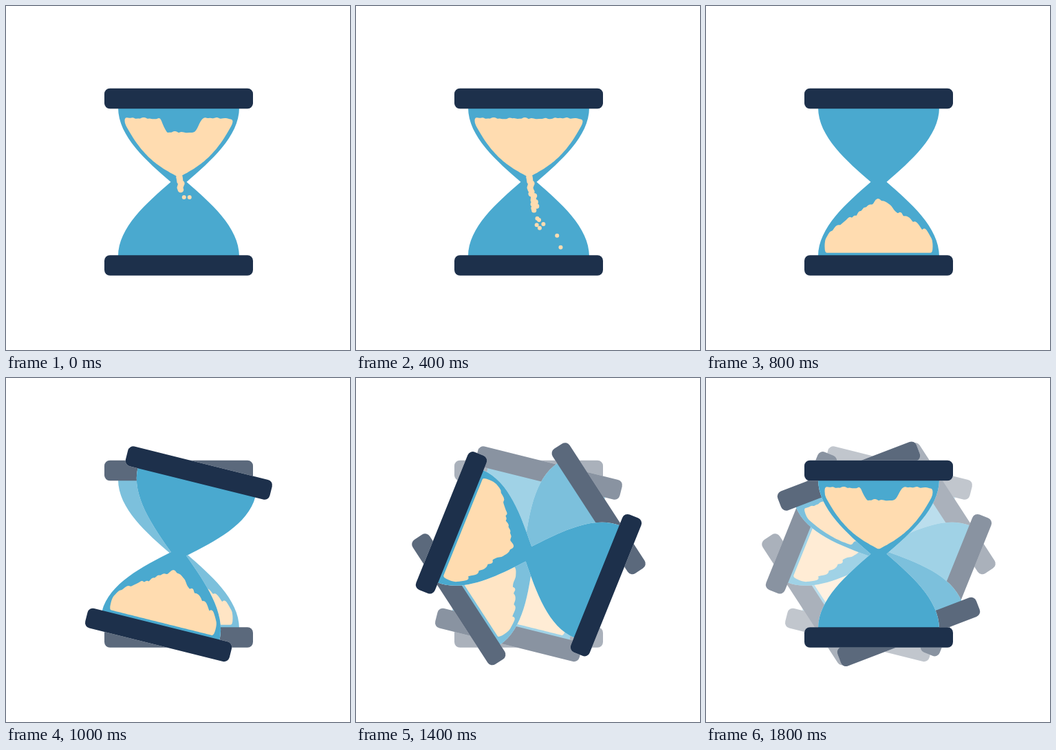
Write an HTML page that moves like this. It is 500 px wide and 500 px high and loops after 2000 ms.

```html
<!DOCTYPE html>
<html lang="en">
<head>
<meta charset="utf-8">
<title>Hourglass</title>
<style>
  html, body { margin: 0; width: 100%; height: 100%; overflow: hidden; background: #fff; }
  svg { display: block; width: 100vw; height: 100vh; }
  .cap { fill: var(--blank, #1d304b); }
  .glass { fill: var(--blank, #4aa9cf); }
  .sand { fill: #ffdcb0; }
  path.sand { stroke: #ffdcb0; stroke-width: 3; stroke-linejoin: round; }
  .blank { --blank: #fff; }
</style>
</head>
<body>
<svg id="stage" viewBox="0 0 500 500">
  <defs>
    <g id="hourglass">
      <path class="glass" d="M-88-108C-88-66-46-30-11.500 0C-46 30-88 66-88 108H88C88 66 46 30 11.500 0C46-30 88-66 88-108Z"/>
      <rect class="cap" x="-108" y="-136" width="216" height="29.500" rx="8"/>
      <rect class="cap" x="-108" y="106.500" width="216" height="29.500" rx="8"/>
    </g>
  </defs>
</svg>
<script>
const STEP = 200, STEPS = 10, TURN_START = 4;
const FADE = 0.72;
const CX = 251, CY = 255.75;
const stage = document.getElementById('stage');

function add(parent, tag, attrs) {
  const el = document.createElementNS('http://www.w3.org/2000/svg', tag);
  for (const key in attrs) el.setAttribute(key, attrs[key]);
  return parent.appendChild(el);
}

const noise = (k, seed) => {
  const v = Math.sin(k * 12.9898 + seed * 78.233) * 43758.5453;
  return v - Math.floor(v);
};
const clamp = (v, lo, hi) => Math.min(hi, Math.max(lo, v));

// Sand lies in one bulb, between a surface near the neck and one near the cap
const heap = { crest: 27, slope: 0.66, base: 101.5, notch: 0 };
const filled = (base, notch, crest = 0) => ({ crest, slope: 0, base, notch });
const states = [
  filled(91, 20), filled(91, 9), filled(91, 0), filled(91, 0),
  heap, heap, heap, heap,
  filled(98, 13, 29), filled(95, 18)
];

// Degrees turned: upright heap at TURN_START, upside down at the end
function angle(i) {
  if (i < TURN_START) return 180;
  const p = (i - TURN_START) / (STEPS - 1 - TURN_START);
  return Math.round(90 * (1 - Math.cos(Math.PI * (p - 0.02))));
}

// Closed curve through the middles of the sides
function smooth(pts) {
  const mid = (a, b) => [(a[0] + b[0]) / 2, (a[1] + b[1]) / 2];
  let d = 'M' + mid(pts[pts.length - 1], pts[0]);
  pts.forEach((p, i) => d += `Q${p} ${mid(p, pts[(i + 1) % pts.length])}`);
  return d + 'Z';
}

function sandPath({ crest, slope, base, notch }) {
  const inner = [], outer = [];
  for (let x = -77; x <= 77; x += 3.5) {
    const r = Math.abs(x);
    const wall = 8.5 + 0.53 * r + 8e-5 * r ** 3;
    const pile = crest && crest + slope * r + 7 * (noise(x, 3) - 0.5);
    const dip = notch * clamp((31 - Math.abs(x + 3)) / 9, 0, 1);
    const ripple = slope ? 0 : 3 * (noise(x, 5) - 0.5);
    inner.push([x, Math.max(wall, pile)]);
    outer.unshift([x, base - dip + ripple]);
  }
  return smooth([...inner, ...outer]);
}

// Falling sand: a ragged stream that grows, then loose grains below it
function pour(parent, i) {
  const grain = (cx, cy, r) => add(parent, 'circle', { class: 'sand', cx, cy, r });
  const end = 268 + 15 * i;
  for (let y = 249; y < end; y += 3) {
    const fall = y - 249;
    grain(252 + fall * 0.18 + Math.min(fall / 3, 8) * (noise(y, 1) - 0.5), y, 4.8 - fall / 40);
  }
  for (let k = 0; k < 2 + 2.5 * i; k++) {
    const drop = 10 + 22 * i * noise(k, 8);
    grain(256 + i * 3 + (6 + drop * 0.7) * noise(k, 4), Math.min(end + drop, 353), 3);
  }
}

const poses = states.map((state, i) => {
  const g = add(stage, 'g', {});
  const transform = `translate(${CX} ${CY}) rotate(${angle(i)})`;
  add(g, 'use', { href: '#hourglass', class: 'blank', transform });
  const ink = add(g, 'g', {});
  add(ink, 'use', { href: '#hourglass', transform });
  add(ink, 'path', { class: 'sand', d: sandPath(state), transform });
  if (i < TURN_START) pour(ink, i);
  return { g, ink };
});

function draw() {
  const now = Math.floor(performance.now() / STEP) % STEPS;
  poses.forEach(({ g, ink }, i) => {
    const age = now - i;
    const shown = age === 0 || (age > 0 && i >= TURN_START);
    g.setAttribute('display', shown ? 'inline' : 'none');
    ink.setAttribute('opacity', FADE ** Math.max(age, 0));
  });
  requestAnimationFrame(draw);
}
draw();
</script>
</body>
</html>
```
